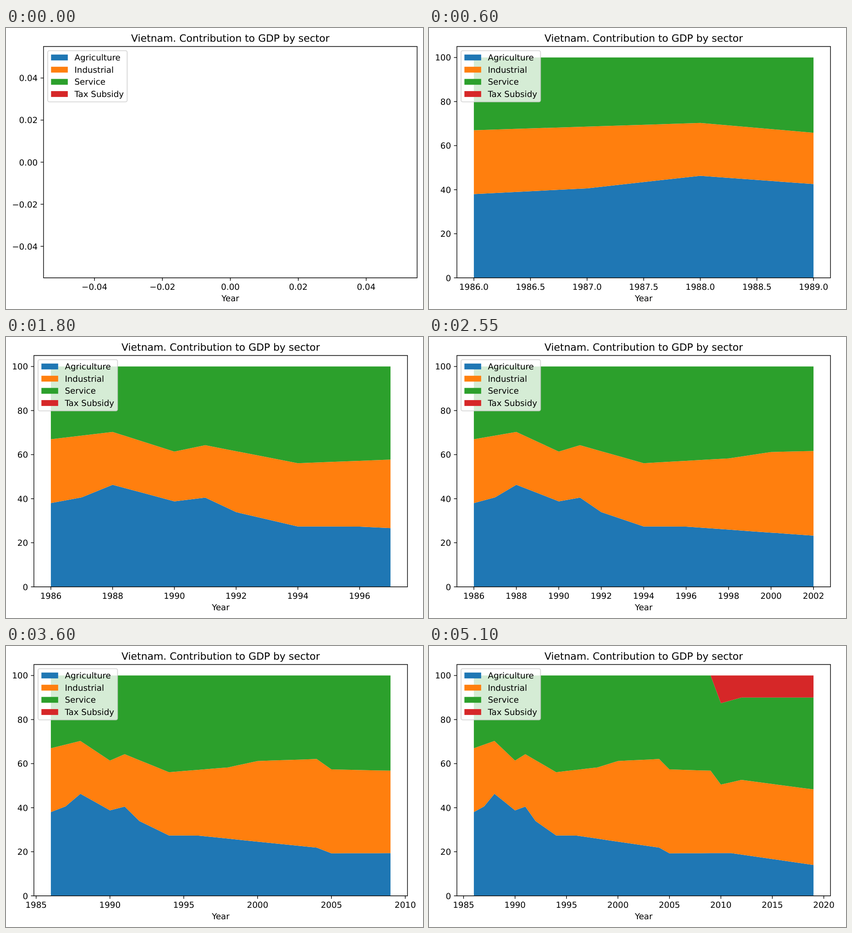
An HTML page for the animation above (5.25 s loop, 910x615 px).

```html
<!DOCTYPE html>
<html lang="en">
<head>
<meta charset="utf-8">
<title>GDP by sector</title>
<style>
  html, body { margin: 0; width: 100%; height: 100%; overflow: hidden; background: #fff; }
  svg { display: block; width: 910px; height: 615px; }
  text { font-family: "DejaVu Sans", sans-serif; font-size: 18.26px; text-rendering: geometricPrecision; }
</style>
</head>
<body>
<svg id="stage" viewBox="0 0 910 615"></svg>
<script>
const STEP_MS = 150, STEPS = 35, FIRST_YEAR = 1986;
const WIDTH = 815.3, TOP = 40.45, HEIGHT = 506.3, BOTTOM = TOP + HEIGHT;
const EM = 18.26, TICK = 6.4, LINE = 1.4;

const sectors = [
  ["Agriculture", "#1f77b4"],
  ["Industrial", "#ff7f0e"],
  ["Service", "#2ca02c"],
  ["Tax Subsidy", "#d62728"],
];

// Boundaries between the layers, bottom to top: turning points as [years elapsed, percent].
const boundaries = [
  [[0, 0]],
  [[0, 38], [1, 40.6], [2, 46.3], [4, 38.8], [5, 40.5], [6, 33.9], [8, 27.4],
   [10, 27.3], [18, 21.9], [19, 19.3], [25, 19.4], [33, 14]],
  [[0, 67], [2, 70.3], [4, 61.4], [5, 64.3], [8, 56.1], [12, 58.3], [14, 61.2],
   [18, 62.1], [19, 57.4], [23, 56.8], [24, 50.5], [26, 52.6], [33, 48.3]],
  [[23, 100], [24, 87.4], [26, 90]],
  [[0, 100]],
];

function valueAt(points, x) {
  const next = points.findIndex(p => p[0] >= x);
  if (next < 0) return points[points.length - 1][1];
  if (next === 0) return points[0][1];
  const [x0, y0] = points[next - 1], [x1, y1] = points[next];
  return y0 + (y1 - y0) * (x - x0) / (x1 - x0);
}

const rect = (x, y, w, h, attrs) => `<rect x="${x}" y="${y}" width="${w}" height="${h}" ${attrs}/>`;
const text = (x, y, label, anchor = "start", attrs = "") =>
  `<text x="${x}" y="${y}" text-anchor="${anchor}" ${attrs}>${label}</text>`;
const line = d => `<path d="${d}" stroke="#000" stroke-width="${LINE}" fill="none"/>`;

// Round steps giving at most nine intervals, with only the decimals the step needs.
function tickLabels([low, high]) {
  const rough = (high - low) / 9;
  const scale = 10 ** Math.floor(Math.log10(rough));
  const step = scale * [1, 2, 2.5, 5, 10].find(s => s * scale >= rough - 1e-9);
  let digits = 0;
  while (Math.abs(step * 10 ** digits - Math.round(step * 10 ** digits)) > 1e-6) digits++;
  const ticks = [];
  for (let n = Math.ceil(low / step - 1e-6); n * step <= high + step * 1e-6; n++) {
    ticks.push([n * step, (n * step).toFixed(digits).replace("-", "\u2212")]);
  }
  return ticks;
}

function yearRange(count) {
  if (count === 0) return [-0.055, 0.055];
  const span = count - 1;
  const pad = span ? span * 0.05 : FIRST_YEAR * 0.055;
  return [FIRST_YEAR - pad, FIRST_YEAR + span + pad];
}

function legend(left) {
  const x = left + EM / 2, y = TOP + EM / 2, inset = 0.4 * EM;
  return rect(x, y, 173.4, 112.1,
    'rx="3.65" fill="#fff" fill-opacity=".8" stroke="#ccc" stroke-opacity=".8" stroke-width="1.83"') +
    sectors.map(([name, color], i) => {
      const baseline = TOP + 30.46 + i * 26.66;
      return rect(x + inset, baseline - 0.7 * EM, 2 * EM, 0.7 * EM, `fill="${color}"`) +
        text(x + inset + 2.8 * EM, baseline, name);
    }).join("");
}

function chart(count) {
  const left = count ? 60.85 : 81.9;
  const xRange = yearRange(count);
  const yRange = count ? [0, 105] : [-0.055, 0.055];
  const px = v => left + (v - xRange[0]) / (xRange[1] - xRange[0]) * WIDTH;
  const py = v => BOTTOM - (v - yRange[0]) / (yRange[1] - yRange[0]) * HEIGHT;
  const center = left + WIDTH / 2;
  let out = rect(0, 0, 910, 615, 'fill="#fff"');

  if (count > 1) {
    const years = Array.from({ length: count }, (_, i) => i);
    const edge = points => years.map(i => `${px(FIRST_YEAR + i)},${py(valueAt(points, i))}`);
    sectors.forEach(([, color], s) => {
      const outline = [...edge(boundaries[s]), ...edge(boundaries[s + 1]).reverse()];
      out += `<polygon points="${outline.join(" ")}" fill="${color}"/>`;
    });
  }

  for (const [value, label] of tickLabels(xRange)) {
    out += line(`M${px(value)} ${BOTTOM}v${TICK}`) + text(px(value), 573.4, label, "middle");
  }
  for (const [value, label] of tickLabels(yRange)) {
    out += line(`M${left} ${py(value)}h${-TICK}`) + text(left - 0.7 * EM, py(value) + 6.9, label, "end");
  }
  out += line(`M${left} ${TOP}h${WIDTH}v${HEIGHT}h${-WIDTH}z`);
  out += text(center, 598.3, "Year", "middle");
  out += text(center, 29.6, "Vietnam. Contribution to GDP by sector", "middle", 'style="font-size:21.91px"');
  return out + legend(left);
}

const stage = document.getElementById("stage");
const start = performance.now();
let shown = -1;

function update(now) {
  const count = Math.floor(Math.max(0, now - start) / STEP_MS) % STEPS;
  if (count !== shown) {
    stage.innerHTML = chart(count);
    shown = count;
  }
  requestAnimationFrame(update);
}
update(start);
</script>
</body>
</html>
```
